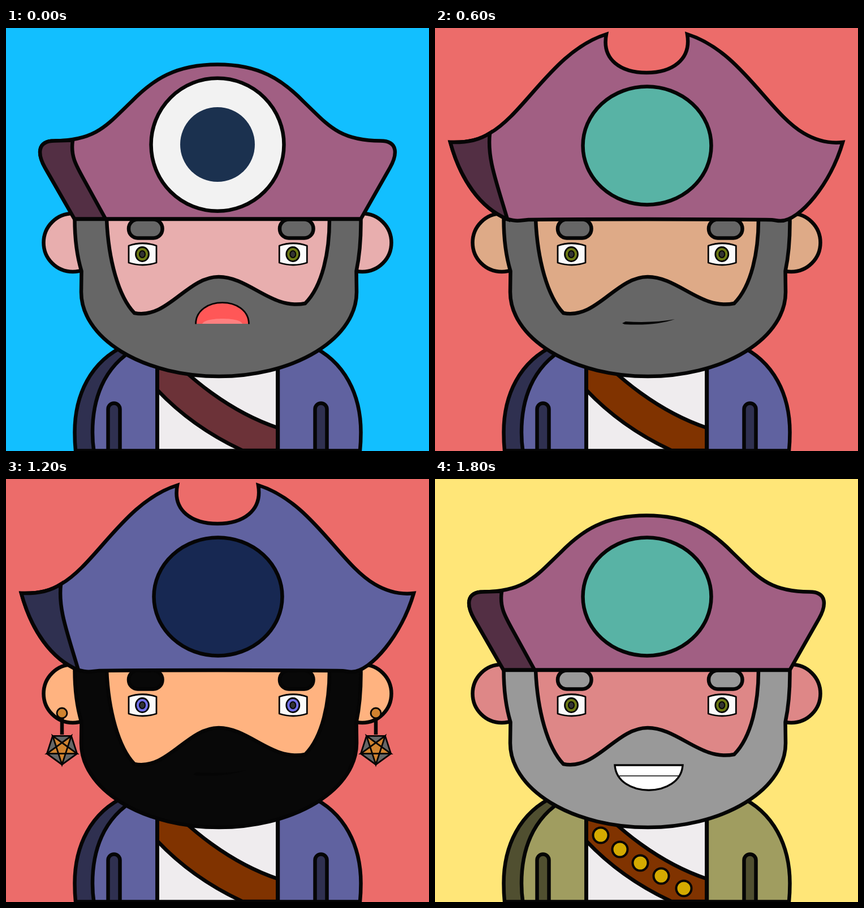
Recreate the animation shown at these times as an HTML page. Size 748 by 748 pixels, loop 2000 ms.

```html
<!DOCTYPE html>
<html lang="en">
<head>
<meta charset="utf-8">
<title>Pirate parade</title>
<style>
  html, body { margin: 0; width: 100%; height: 100%; overflow: hidden; background: #12bfff; }
  svg {
    position: absolute; left: 0; top: 0; width: 748px; height: 748px;
    visibility: hidden;
    animation: show 2s step-end infinite;
  }
  .ink { stroke: #050505; stroke-width: 6.5; }
  .thin { stroke: #050505; stroke-width: 2.8; }
  @keyframes show {
    0% { visibility: visible; }
    10%, 100% { visibility: hidden; }
  }
</style>
</head>
<body>
<script>
const INK = '#050505', GOLD = '#d0832f';

// Cloth colours: [main, shade]
const plum = ['#a15f83', '#532f44'], navy = ['#6062a0', '#2f3050'],
      moss = ['#60a17d', '#30513f'], coal = ['#4d4d4d', '#333333'],
      khaki = ['#a09d60', '#504f30'];
const sky = '#12bfff', coral = '#ec6c6a', green = '#00a368', sand = '#ffe678';

const path = (d, fill, cls = 'ink', extra = '') =>
  `<path d="${d}" fill="${fill}" class="${cls}" ${extra}/>`;
const oval = (x, y, rx, ry, fill, cls = 'ink', extra = '') =>
  `<ellipse cx="${x}" cy="${y}" rx="${rx}" ry="${ry}" fill="${fill}" class="${cls}" ${extra}/>`;
const box = (x, y, w, h, r, fill, cls = 'ink') =>
  `<rect x="${x}" y="${y}" width="${w}" height="${h}" rx="${r}" fill="${fill}" class="${cls}"/>`;

// Closed polygon through points on circles of the given radii, used in turn
function ring(x, y, radii, n, start, step = 1) {
  const pts = Array.from({ length: n }, (_, i) => {
    const a = start + i * step * 2 * Math.PI / n, r = radii[i % radii.length];
    return (x + r * Math.cos(a)).toFixed(1) + ' ' + (y + r * Math.sin(a)).toFixed(1);
  });
  return 'M' + pts.join('L') + 'Z';
}

function body({ coat: [main, shade], belt, studs }) {
  const arm = x => path(`M${x} 750V674a10.5 10.5 0 0 1 21 0V750`, shade);
  const dots = [[293, 630], [327, 655], [363, 679], [400, 702], [440, 724]];
  return path('M212 561C149 589 121.5 650 121.5 715Q121.5 735 123.5 752H268V561Z', shade) +
    path('M230 566C170 600 153 660 153 715Q153 735 156 752H268V566Z', main) +
    path('M481 561H537C600 589 627.5 650 627.5 715Q627.5 735 625.5 752H481Z', main) +
    box(267.5, 550, 213, 200, 0, '#efecee') +
    path('M267.5 555C320 620 400 680 480.5 707V747H418C360 720 310 685 267.5 640Z', belt) +
    (studs ? dots.map(([x, y]) => oval(x, y, 13.5, 13.5, studs, 'ink', 'style="stroke-width:4"')).join('') : '') +
    path('M267.5 570V747M480.5 570V747', 'none') +
    arm(180.5) + arm(546.5) +
    path('M120 747.5H629', 'none');
}

function head({ full, beard, skin }) {
  const ears = oval(118, 379.5, 51.5, 51.5, skin) + oval(630, 379.5, 51.5, 51.5, skin);
  return ears + (full
    ? path('M119 338C119 380 124 405 131 430C130 480 140 541 162 543C172 543 180 530 185 519' +
        'C200 550 225 608 247 610C262 610 264 595 267 578C285 620 320 660 346 660' +
        'C370 658 374 635 374 606C374 635 378 658 402 660C430 660 465 620 481 578' +
        'C485 595 486 610 500 610C525 608 548 550 563 519C568 530 576 543 586 543' +
        'C608 541 618 480 617 430C625 405 629 380 629 338Z', beard) +
      path('M177 338C177 410 205 471 250 471C300 471 325 425 374 425' +
        'C423 425 447 471 497 471C542 471 571 410 571 338Z', skin)
    : path('M121.5 338Q121.5 390 133.5 430L133 467A243.5 149 0 0 0 620 467L619.5 430Q628 390 627.5 338Z', beard) +
      path('M178 338C181 410 199 475 227 504C285 516 320 440 376 440' +
        'C430 440 470 499 529 487C560 456 572 395 572 338Z', skin));
}

function eyes({ full, beard, iris }) {
  const x = full ? 211 : 217, y = full ? 340 : 338.5, h = full ? 31 : 33;
  const brow = dx => box(x + dx, y, full ? 59 : 59.5, h, 16, beard);
  const eye = dx => iris
    ? path(`M${217 + dx} 385Q${241.5 + dx} 376.5 ${266 + dx} 385V415Q${241.5 + dx} 423 ${217 + dx} 415Z`,
        '#fbfbfb', 'thin', 'stroke-linejoin="round"') +
      oval(241 + dx, 400, 11.5, 12.5, iris, 'thin') +
      oval(241 + dx, 400, 5, 6, '#333', 'thin', 'style="stroke-width:2"')
    : box(211 + dx, 394.5, 60.5, 10.5, 0, INK, '');
  return brow(0) + brow(267) + eye(0) + eye(266.3);
}

const mouths = {
  gasp: path('M336 523C336 472 429 472 429 523Z', '#ff5757', '') +
    path('M347 523C352 511 414 511 418 523Z', '#ff8080', '') +
    path('M335.5 523.5C336 473 429 473 429.5 523.5', 'none', 'thin'),
  smile: path('M324 516Q382 552 440 520', 'none', 'thin', 'style="stroke-width:3.2"'),
  flat: path('M331 522L337 519Q385 522 424 515Q390 527 335 524Z', INK, ''),
  smirk: path('M315 520Q318 516 323 517Q390 534 445 510Q392 538 319 523Z', INK, ''),
  grin: path('M318 506H438C434 565 322 565 318 506Z', '#fff', 'thin', 'style="stroke-width:3.4"') +
    path('M326 525H431', 'none', 'thin', 'style="stroke-width:1.3"')
};

function hat({ tri, hat: [main, shade] }) {
  return tri
    ? path('M27 202C60 203 80 197 97 186C160 150 210 40 303 11C294 57 330 79 374 79' +
        'C418 79 454 57 446 11C540 40 590 150 652 186Q686 206 721 202C700 275 645 341 611 341' +
        'C600 341 606 339 585 339Q374 337 165 339C150 340 150 343 128 338C80 318 45 268 27 202Z', main) +
      path('M27 202C60 203 80 197 97 186C92 230 108 270 128 338C80 318 45 268 27 202Z', shade)
    : path('M121 337.5L69 247C56 224 54 199.5 86 199.5C160 199.5 180 170 222 130C260 91 300 64.5 374 64.5' +
        'C448 64.5 488 91 526 130C568 170 588 199.5 662 199.5C694 199.5 692 224 679 247L627.5 337.5Z', main) +
      path('M121 337.5L69 247C56 224 54 199.5 86 199.5L118 198.5C114 225 122 240 140 272L176 337.5Z', shade);
}

const badge = ({ round, disc, dot }) =>
  (round ? oval(374, 206.3, 117.5, 117.5, disc) : oval(375, 208, 113.5, 104.5, disc)) +
  (dot ? oval(374, 206, 66, 66, dot, '') : '');

const drop = (x, charm) =>
  path(`M${x} 422V452`, 'none') + oval(x, 414, 9, 9, GOLD, 'thin') + charm(x);

const up = -Math.PI / 2;
const pair = charm => drop(99, charm) + drop(654, charm);
const rings = {
  hoop: oval(75.5, 426.5, 22.5, 22.5, 'none', 'ink', 'style="stroke-width:10"') +
    oval(87, 404.5, 8, 8, GOLD, 'thin') +
    oval(75.5, 426.5, 22.5, 22.5, 'none', '', `stroke="${GOLD}" stroke-width="5"`),
  star: pair(x => path(ring(x, 474, [25, 11], 10, up), GOLD, 'thin')),
  penta: pair(x => path(ring(x, 477, [28], 5, -up), '#666', 'thin') +
    path(ring(x, 477, [28], 5, -up, 2), GOLD, 'thin'))
};

const scenes = [
  { bg: sky, hat: plum, coat: navy, skin: '#e8aeae', beard: '#666666', iris: '#6c7a14',
    mouth: 'gasp', belt: '#6c3238', round: 1, disc: '#f2f2f2', dot: '#1b314f' },
  { bg: sky, hat: moss, coat: plum, skin: '#ffb380', beard: '#a02c2c', iris: '#2ca0b5',
    mouth: 'smirk', belt: '#1a1a1a', disc: '#2775cf', ring: 'hoop' },
  { bg: coral, hat: navy, coat: plum, skin: '#ff9955', beard: '#c8ab37', full: 1,
    mouth: 'smile', belt: '#1a1a1a', studs: '#cccccc', round: 1, disc: '#0090ff' },
  { bg: coral, hat: plum, tri: 1, coat: navy, skin: '#deaa87', beard: '#666666', iris: '#6c7a14',
    mouth: 'flat', belt: '#803300', disc: '#58b3a5' },
  { bg: sky, hat: moss, tri: 1, coat: moss, skin: '#e8aeae', beard: '#2b1100', full: 1, iris: '#2ca0b5',
    mouth: 'smile', belt: '#1a1a1a', round: 1, disc: '#0090ff' },
  { bg: green, hat: moss, coat: coal, skin: '#ffb380', beard: '#a02c2c', iris: '#6c7a14',
    mouth: 'flat', belt: '#6c3238', disc: '#2775cf', ring: 'hoop' },
  { bg: coral, hat: navy, tri: 1, coat: navy, skin: '#ffb380', beard: '#080808', iris: '#7270e8',
    mouth: 'flat', belt: '#803300', disc: '#172852', ring: 'penta' },
  { bg: green, hat: moss, tri: 1, coat: plum, skin: '#deaa87', beard: '#d45500', full: 1, iris: '#37800c',
    mouth: 'smirk', belt: '#c49a78', disc: '#02a8f3', ring: 'star' },
  { bg: green, hat: navy, coat: moss, skin: '#e8aeae', beard: '#666666', iris: '#6c7a14',
    mouth: 'flat', belt: '#6c3238', disc: '#0090ff', round: 1 },
  { bg: sand, hat: plum, coat: khaki, skin: '#de8787', beard: '#999999', iris: '#6c7a14',
    mouth: 'grin', belt: '#803300', studs: '#d4aa00', disc: '#58b3a5' }
];

document.body.innerHTML = scenes.map((s, i) =>
  `<svg viewBox="0 0 748 748" style="background:${s.bg};animation-delay:${i * 200 - 2000}ms">` +
  body(s) + head(s) + eyes(s) + mouths[s.mouth] + hat(s) + badge(s) + (rings[s.ring] || '') +
  '</svg>').join('');
</script>
</body>
</html>
```
